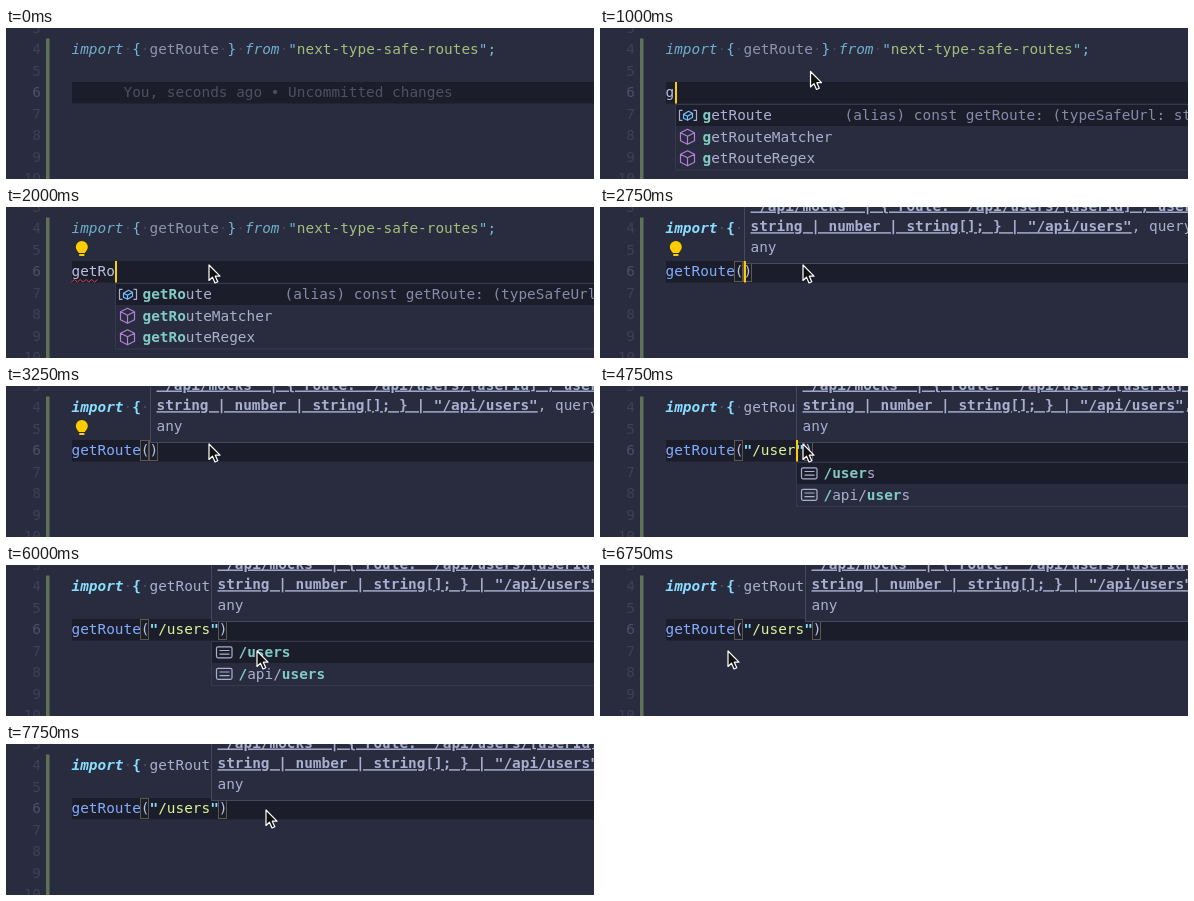
Recreate the animation shown at these times as an HTML page. Size 588x151 px, loop 8 s.

```html
<!DOCTYPE html>
<html lang="en">
<head>
<meta charset="utf-8">
<title>Route autocomplete</title>
<style>
  html, body { margin: 0; width: 100%; height: 100%; overflow: hidden; background: #292c3e; }
  svg { display: block; }
  text { font: 14.4px "DejaVu Sans Mono", monospace; white-space: pre; fill: #a9afd0; }
  .key { fill: #82d3f3; font-style: italic; }
  .punct { fill: #89ddff; }
  .active .key, .active .punct { fill: #89ddff; font-weight: bold; }
  .dot { fill: #484c64; }
  .string { fill: #c3e88d; }
  .route { fill: #d9f59a; }
  .call { fill: #82aaff; }
  .name { fill: #b9bfdf; }
  .match { fill: #80cbc4; font-weight: bold; }
  .param { font-weight: bold; text-decoration: underline; }
  .detail { fill: #858aa8; }
  .ghost { fill: #4d5064; }
  .number { fill: #3d4157; text-anchor: end; }
  .current { fill: #4b4f68; }
</style>
</head>
<body>
<svg id="stage" width="588" height="151" viewBox="0 0 588 151"></svg>
<script>
const LOOP = 8000, TICK = 250;
const LEFT = 65.5, CHAR = 8.669, LINE = 21.5;
const DARK = '#1c1d2a', PANEL = '#292c3e', EDGE = '#454960';
const stage = document.getElementById('stage');

// time, text before caret, text after caret, caret visible, suggestion list
const edits = [
  [0, '', '', 0, ''],
  [250, '', '', 1, ''],
  [750, '', '', 0, ''],
  [1000, 'g', '', 1, 'names'],
  [1250, 'ge', '', 1, 'names'],
  [1500, 'get', '', 1, 'names'],
  [1750, 'getR', '', 1, 'names'],
  [2000, 'getRo', '', 1, 'names'],
  [2250, 'getRou', '', 1, 'names'],
  [2500, 'getRoute', '', 1, 'names'],
  [2750, 'getRoute(', ')', 1, ''],
  [3250, 'getRoute(', ')', 0, ''],
  [3750, 'getRoute("', '")', 1, 'routes'],
  [4000, 'getRoute("/', '")', 1, 'routes'],
  [4250, 'getRoute("/u', '")', 1, 'routes'],
  [4500, 'getRoute("/us', '")', 1, 'routes'],
  [4750, 'getRoute("/user', '")', 1, 'routes'],
  [5000, 'getRoute("/users', '")', 1, 'routes'],
  [5500, 'getRoute("/users', '")', 0, 'routes'],
  [6500, 'getRoute("/users', '")', 0, '']
];

// time, x, y of the pointer tip
const pointer = [
  [500, 232, 2], [1250, 203, 58], [5000, 203, 58], [6000, 251, 86],
  [6250, 246, 87], [6750, 128, 86], [7250, 222, 74], [7500, 257, 67], [7750, 260, 66]
];

const col = n => LEFT + n * CHAR;
const baseline = line => 69 + (line - 6) * LINE;
const span = ([str, cls]) => `<tspan class="${cls}">${str}</tspan>`;
const text = (x, y, ...parts) => `<text x="${x}" y="${y}">${parts.map(span).join('')}</text>`;
const rect = (x, y, w, h, fill, extra = '') =>
  `<rect x="${x}" y="${y}" width="${w}" height="${h}" fill="${fill}" ${extra}/>`;
const lines = (d, stroke, width = 1.2) =>
  `<path d="${d}" fill="none" stroke="${stroke}" stroke-width="${width}" stroke-linejoin="round"/>`;

function gutter() {
  let out = rect(40, 10.5, 3.5, 141, '#5f7258');
  for (let n = 3; n <= 10; n++) {
    out += `<text class="number${n === 6 ? ' current' : ''}" x="35" y="${baseline(n)}">${n}</text>`;
  }
  return out;
}

// The whole import is faded until it is used
function importLine(used) {
  const dot = ['·', 'dot'];
  return `<g ${used ? 'class="active"' : 'opacity="0.78"'}>` + text(LEFT, baseline(4),
    ['import', 'key'], dot, ['{', 'punct'], dot, ['getRoute', ''], dot, ['}', 'punct'], dot,
    ['from', 'key'], dot, ['"', 'punct'], ['next-type-safe-routes', 'string'], ['";', 'punct']) + '</g>';
}

function codeLine(code) {
  const open = code.indexOf('(');
  if (open < 0) return text(LEFT, baseline(6), [code, 'name']);
  const boxes = [open, code.length - 1].map(n =>
    rect(Math.floor(col(n)) + 0.5, 54.5, 8, 20, 'none', 'stroke="#5c5850"')).join('');
  const args = code.slice(open + 1, -1);
  const quoted = args ? [['"', 'punct'], [args.slice(1, -1), 'route'], ['"', 'punct']] : [];
  return boxes + '<g class="active">' + text(LEFT, baseline(6),
    [code.slice(0, open), 'call'], ['(', 'name'], ...quoted, [')', 'name']) + '</g>';
}

function squiggle(from, count) {
  let d = `M${col(from)} 75`;
  for (let i = 1; i <= count * 3; i++) d += `L${col(from + i / 3)} ${i % 2 ? 72.5 : 75}`;
  return lines(d, '#c2484f', 1);
}

function bulb() {
  return '<g fill="#ffcc00"><circle cx="75.8" cy="40" r="6"/><path d="M72.5 43h6.6v3h-6.6z"/></g>'
    + rect(73, 47, 5.6, 2, '#ffcc00', 'rx="1"');
}

function hint(x) {
  const tx = x + 6.5;
  return rect(x + 0.5, -2, 600, 58.5, PANEL, `stroke="${EDGE}"`)
    + text(tx, 3.5, ['"/api/mocks" | { route: "/api/users/[userId]", userId:', 'param'])
    + text(tx, 24.2, ['string | number | string[]; } | "/api/users"', 'param'], [', query?: any): string', ''])
    + text(tx, 45, ['any', '']);
}

const icons = {
  alias: (x, y) => lines(`M${x + 3} ${y - 5}h-3v10h3M${x + 14} ${y - 5}h3v10h-3`, '#a9afd0')
    + lines(`M${x + 4} ${y - 1}l5-3 4 2v4l-5 3-4-2zl4 2 5-3M${x + 8} ${y + 1}v4`, '#75beff'),
  cube: (x, y) => lines(`M${x + 8} ${y - 7.5}l7 3.5v8l-7 3.5-7-3.5v-8zM${x + 1} ${y - 4}l7 3.5 7-3.5M${x + 8} ${y - 0.5}v8`, '#b180d7'),
  word: (x, y) => rect(x + 1, y - 5.5, 15.5, 11, 'none', 'rx="1.5" stroke="#a9afd0" stroke-width="1.2"')
    + lines(`M${x + 4} ${y - 1.8}h10M${x + 4} ${y + 1.8}h10`, '#a9afd0')
};

// Splits a label into matched and plain parts
function highlight(label, query) {
  if (label.startsWith(query)) return [[query, 'match'], [label.slice(query.length), '']];
  const rest = query.slice(1), at = label.lastIndexOf(rest);
  return [['/', 'match'], [label.slice(1, at), ''], [rest, 'match'], [label.slice(at + rest.length), '']];
}

function suggestions(kind, x, query) {
  const names = kind === 'names';
  const labels = names ? ['getRoute', 'getRouteMatcher', 'getRouteRegex']
    : query.length > 1 ? ['/users', '/api/users'] : ['/', '/api/mocks', '/api/users'];
  let out = rect(x + 0.5, 76.5, 600, labels.length * LINE + 1, PANEL, `stroke="#36394d"`)
    + rect(x + 1, 77, 600, LINE - 0.5, DARK);
  labels.forEach((label, i) => {
    const y = 87.3 + i * LINE;
    const icon = !names ? 'word' : i ? 'cube' : 'alias';
    out += icons[icon](x + 4.5, y) + text(x + 27.5, y + 5, ...highlight(label, query));
  });
  if (names) out += text(x + 169.5, 92.3, ['(alias) const getRoute: (typeSafeUrl: string', 'detail']);
  return out;
}

function arrow(t) {
  if (t < pointer[0][0]) return '';
  const next = pointer.findIndex(p => p[0] > t);
  const b = next < 0 ? pointer[pointer.length - 1] : pointer[next];
  const a = next < 0 ? b : pointer[next - 1];
  const k = a === b ? 0 : (t - a[0]) / (b[0] - a[0]);
  const ease = k * k * (3 - 2 * k);
  const x = a[1] + (b[1] - a[1]) * ease, y = a[2] + (b[2] - a[2]) * ease;
  return `<path transform="translate(${x} ${y})" d="M0 0V15.5L3.5 12.2 6 18 8.8 16.8 6.3 11.2H11Z"
    fill="#111" stroke="#fff" stroke-width="1.2" stroke-linejoin="round"/>`;
}

function draw(t) {
  const [, before, after, caret, list] = edits.filter(e => e[0] <= t).pop();
  const called = before.includes('(');
  const x = Math.ceil(col(before.length));
  const query = called ? before.split('"')[1] || '' : before;
  let out = rect(0, 0, 588, 151, PANEL) + rect(66, 54, 522, 21.5, DARK) + gutter() + importLine(called);
  out += before ? codeLine(before + after)
    : text(col(6), baseline(6), ['You, seconds ago • Uncommitted changes', 'ghost']);
  if (t >= 1750 && t < 2500) out += squiggle(0, 3);
  if (t >= 3750 && t < 4250) out += squiggle(9, 3);
  if (t >= 1750 && t < 3750) out += bulb();
  if (called) out += hint(x);
  if (list) out += suggestions(list, x, query);
  if (caret) out += rect(x, 54, 2, 21.5, '#ffcc00');
  stage.innerHTML = out + arrow(t);
}

const start = performance.now();
let shown = -1;
function tick() {
  const t = Math.floor((performance.now() - start) % LOOP / TICK) * TICK;
  if (t !== shown) draw(shown = t);
  requestAnimationFrame(tick);
}
tick();
</script>
</body>
</html>
```
